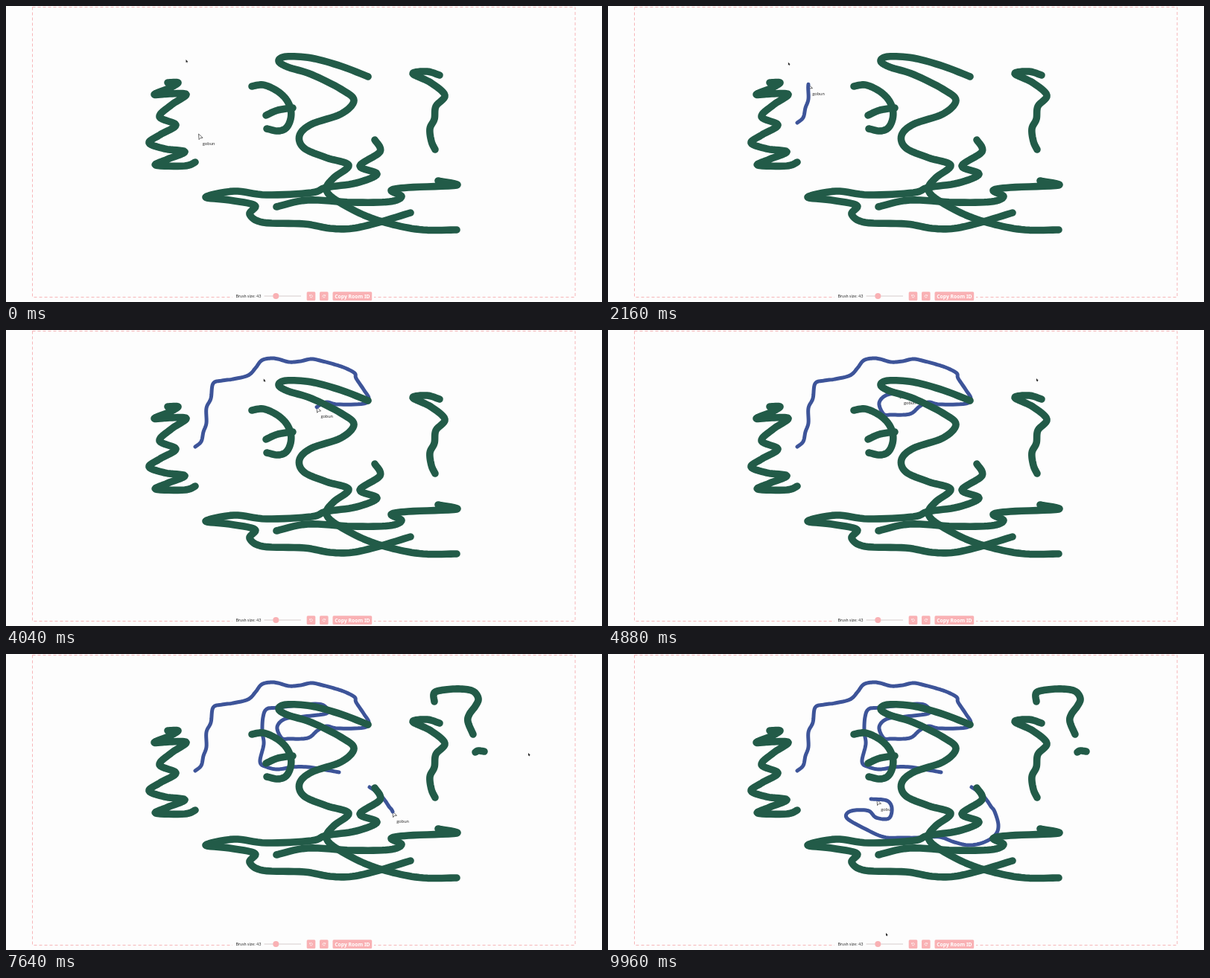
An HTML page that plays this animation: 800x398 px, repeating every 10 s.

```html
<!DOCTYPE html>
<html lang="en">
<head>
<meta charset="utf-8">
<title>Shared drawing board</title>
<style>
  html, body { margin: 0; width: 100%; height: 100%; overflow: hidden; background: #fdfdfd; }
  svg { display: block; width: 100vw; height: 100vh; }
  .ink { fill: none; stroke-linecap: round; stroke-linejoin: round; }
  .green { stroke: #225b48; stroke-width: 9.6; }
  .blue { stroke: #3d5499; stroke-width: 5; }
  text { font-family: Lato, sans-serif; fill: #333; }
  .pink { fill: #f9b1b4; }
  .icon { fill: none; stroke: #fff; stroke-width: .7; }
</style>
</head>
<body>
<svg viewBox="0 0 800 398">
  <rect width="800" height="398" fill="#fdfdfd"/>
  <rect x="35.5" y="1.5" width="728.5" height="390" fill="none" stroke="#f6b6b8" stroke-dasharray="4 3"/>
  <g id="remote">
    <path d="M0 0L.6 7.6L2.4 5.5L5.6 5.2Z" fill="#fff" stroke="#444" stroke-width=".8" stroke-linejoin="round"/>
    <text x="5.3" y="14.8" font-size="6">gobun</text>
  </g>
  <g id="blue" class="ink blue"></g>
  <g id="green" class="ink green"></g>
  <rect x="304" y="383" width="190" height="15" fill="#fdfdfd"/>
  <text x="308.5" y="392" font-size="5.55">Brush size: 43</text>
  <path d="M346.5 390H396" stroke="#d5cccc"/>
  <circle class="pink" cx="362.3" cy="390" r="4"/>
  <rect class="pink" x="403.7" y="384.3" width="11.6" height="11.6" rx="1.5"/>
  <rect class="pink" x="421" y="384.3" width="11.6" height="11.6" rx="1.5"/>
  <rect class="pink" x="438.5" y="384.3" width="52.7" height="11.6" rx="1.5"/>
  <path class="icon" d="M408.2 389.2A1.7 1.7 0 1 1 408 390.8M407.6 388.2V389.6H409"/>
  <path class="icon" d="M428.2 389.2A1.7 1.7 0 1 0 428.4 390.8M428.8 388.2V389.6H427.4"/>
  <text x="464.9" y="392.7" text-anchor="middle" style="font:600 6.8px 'Noto Sans',sans-serif;fill:#fff">Copy Room ID</text>
  <path id="local" d="M0 0V4L.9 3.2L1.6 4.4L2.2 4L1.6 2.9H2.8Z" fill="#222"/>
</svg>
<script>
const LOOP = 10000, STEP = 40, SUB = 8;
const $ = id => document.getElementById(id);
const parse = s => s.split(' ').map(p => p.split(',').map(Number));

const still = [
  '217,103 231,103 220,110 199,119 220,118 242,119 222,133 206,149 228,160 207,173 192,184 213,192 240,196 217,206 201,214 240,215 254,210',
  '330,108 345,106 362,113 375,124 382,138 382,152 376,164 365,168 350,165',
  '349,147 365,140 385,137',
  '486,95 450,81 410,70 376,68 366,74 378,82 410,92 450,112 467,127 450,145 410,159 394,174 400,191 430,204 460,214 440,231 430,245 440,259 480,281 520,294 560,301 605,301',
  '495,180 502,196 475,215 498,226 470,238 430,244 410,251 350,254 306,249 268,257 300,261 334,268 327,280 345,291 400,293 435,299 465,299 500,291 543,278',
  '363,270 405,261 465,264 515,263 531,256 517,248 540,244 605,241 580,235',
  '582,93 565,88 546,91 570,103 589,120 577,135 575,152 569,165 571,182 576,193'
];

// Each key is [time, position along the points]
const live = [
  { ink: 'blue',
    pts: '254,157 262,150 265,137 269,125 269,105 275,92 278,72 290,68 305,66 325,61 335,51 343,41 355,38 365,39 380,43 395,42 410,39 425,42 440,46 455,51 468,58 470,65 480,80 487,92 480,99 445,100 430,97 418,103 405,113 380,114 370,113 364,98 375,87 400,84 430,80 430,72 415,67 365,72 350,74 345,85 344,105 346,121 341,145 350,152 365,155 385,152 405,152 430,156 447,159',
    keys: [[960, 0], [1120, 2], [2080, 2.7], [3200, 20.6], [4160, 28], [4880, 32.7], [6080, 41], [7040, 48]] },
  { ink: 'blue',
    pts: '488,179 500,187 508,196 514,205 519,212 524,230 520,243 505,253 485,257 465,253 445,246 420,247 395,247 370,246 345,235 322,222 321,214 332,210 350,211 360,220 377,221 381,207 374,197 353,195',
    keys: [[7320, 0], [7640, 4], [8320, 10], [9360, 16], [9860, 23]] },
  { ink: 'green',
    pts: '575,64 575,52 590,48 610,47 627,50 634,60 630,70 622,81 620,91 627,108',
    keys: [[5980, 0], [6080, .5], [6240, 2], [6920, 9]] },
  { ink: 'green', pts: '630,132 634,130 642,131', keys: [[7120, 0], [7280, 2]] }
];

const remoteKeys = [[0, 258.5, 172], [480, 256, 178], [960, 254, 157]];
const hopKeys = [[7040, 447, 159], [7320, 488, 179]];
const restKeys = [[9860, 353, 195], [9960, 361, 196]];
const localKeys = [
  [0, 241.5, 72], [450, 390, 48], [900, 563, 60], [1120, 559, 69], [1600, 365, 388],
  [1850, 209, 180], [2080, 242, 76], [3200, 240, 71], [3700, 525, 50], [4180, 272, 72],
  [4500, 420, 37], [4880, 575, 65], [5200, 575, 66], [5550, 365, 388], [5740, 214, 200], [5980, 575, 64]
];
const gapKeys = [[6920, 627, 108], [7120, 630, 132]];
const tailKeys = [[7280, 642, 131], [7640, 701, 133], [8340, 701, 168], [9000, 650, 250], [9960, 373, 375]];

function track(keys, t) {
  const last = keys.length - 1;
  if (t <= keys[0][0]) return keys[0].slice(1);
  for (let i = 0; i < last; i++) {
    const a = keys[i], b = keys[i + 1];
    if (t < b[0]) {
      const k = (t - a[0]) / (b[0] - a[0]);
      return a.slice(1).map((v, j) => v + (b[j + 1] - v) * k);
    }
  }
  return keys[last].slice(1);
}

function spline(p, u) {
  const n = p.length - 1, i = Math.min(Math.floor(u), n - 1), k = u - i;
  const [a, b, c, d] = [p[Math.max(i - 1, 0)], p[i], p[i + 1], p[Math.min(i + 2, n)]];
  return [0, 1].map(j => b[j] + .5 * k * (c[j] - a[j]
    + k * (2 * a[j] - 5 * b[j] + 4 * c[j] - d[j] + k * (3 * (b[j] - c[j]) + d[j] - a[j]))));
}

function curve(p, end) {
  const out = [];
  for (let i = 0; i < end * SUB; i++) out.push(spline(p, i / SUB));
  out.push(spline(p, end));
  return 'M' + out.map(q => q.map(v => v.toFixed(2)).join(' ')).join('L') + (end ? '' : 'h.01');
}

function addPath(layer) {
  const el = document.createElementNS('http://www.w3.org/2000/svg', 'path');
  $(layer).append(el);
  return el;
}

for (const s of still) {
  const p = parse(s);
  addPath('green').setAttribute('d', curve(p, p.length - 1));
}
for (const s of live) {
  s.p = parse(s.pts);
  s.el = addPath(s.ink);
}

const tip = (s, t) => spline(s.p, track(s.keys, t)[0]);
const place = (id, [x, y]) => $(id).setAttribute('transform', `translate(${x.toFixed(2)} ${y.toFixed(2)})`);

function remoteAt(t) {
  if (t < 960) return track(remoteKeys, t);
  if (t < 7040) return tip(live[0], t);
  if (t < 7320) return track(hopKeys, t);
  return t < 9860 ? tip(live[1], t) : track(restKeys, t);
}

function localAt(t) {
  if (t < 5980) return track(localKeys, t);
  if (t < 6920) return tip(live[2], t);
  if (t < 7120) return track(gapKeys, t);
  return t < 7280 ? tip(live[3], t) : track(tailKeys, t);
}

function draw(t) {
  for (const s of live) {
    const on = t >= s.keys[0][0];
    s.el.setAttribute('d', on ? curve(s.p, track(s.keys, t)[0]) : '');
  }
  place('remote', remoteAt(t));
  place('local', localAt(t));
}

const start = performance.now();
function tick(now) {
  const t = Math.max(0, now - start) % LOOP;
  draw(Math.floor(t / STEP) * STEP);
  requestAnimationFrame(tick);
}
draw(0);
requestAnimationFrame(tick);
</script>
</body>
</html>
```
